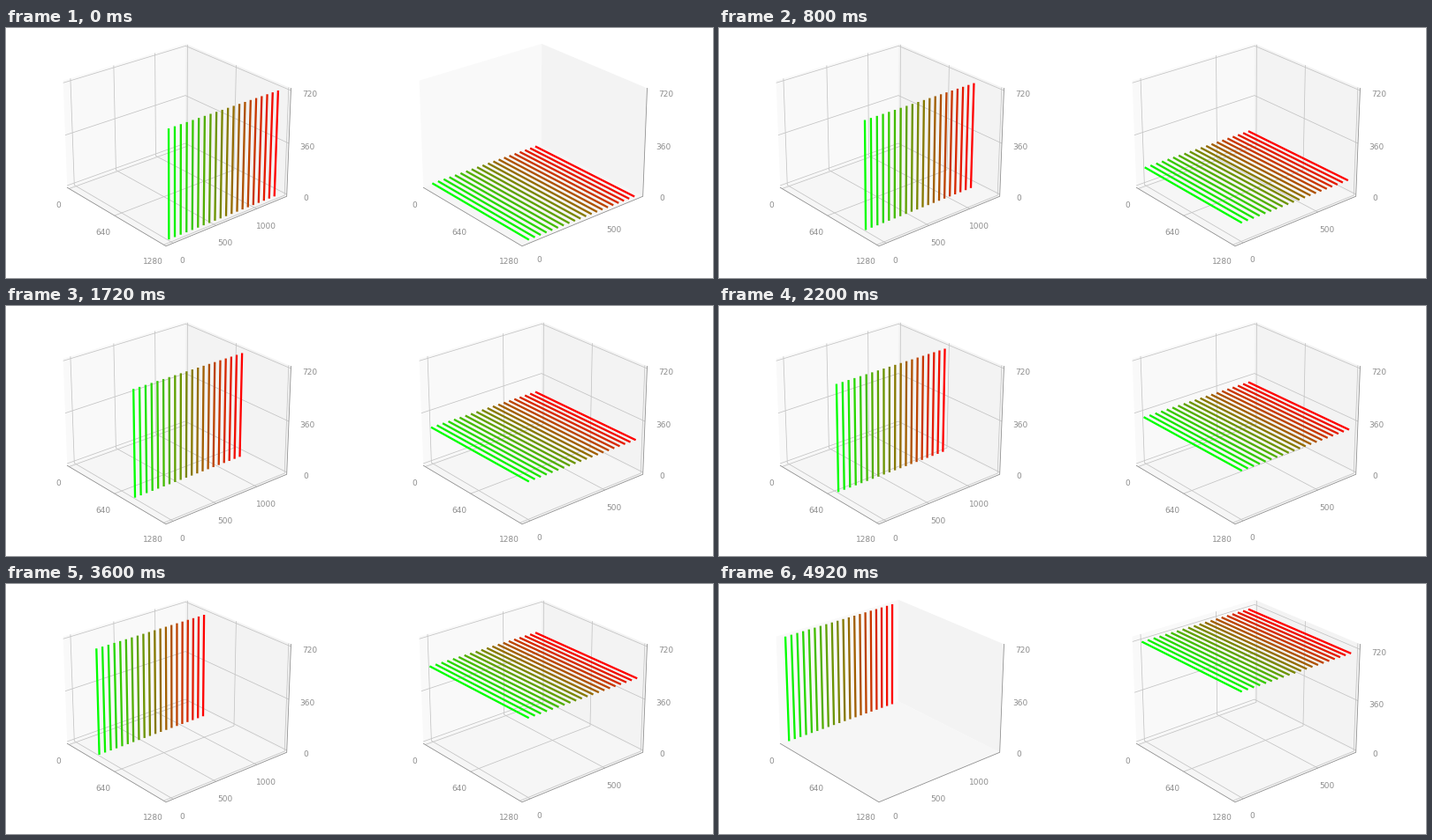
Write a matplotlib script that moves like this. It is 800x284 px and loops after 5 s.

```python
import numpy as np
import matplotlib.pyplot as plt
from matplotlib.animation import FuncAnimation
from matplotlib.collections import LineCollection

W, H, DPI = 800, 284, 100
PX = 72 / DPI                     # one pixel in points
STEPS = 50
LINES = 20
ELEV, AZIM, DIST = np.radians(25), np.radians(40), 10
HALF_BOX = np.array([0.595, 0.595, 0.4465])
SCALE = 150.9

plt.rcParams["font.family"] = "DejaVu Sans"
fig = plt.figure(figsize=(W / DPI, H / DPI), dpi=DPI, facecolor="white")
ax = fig.add_axes([0, 0, 1, 1])
ax.set_xlim(-0.5, W - 0.5)
ax.set_ylim(H - 0.5, -0.5)
ax.axis("off")

COLORS = [(t, 1 - t, 0) for t in np.linspace(0, 1, LINES)]


class Panel:
    """A perspective box with panes, grid, labels and a set of moving lines."""

    Z_TICKS = (0, 360, 720)

    def __init__(self, center, y_limits, y_ticks):
        self.center = center
        self.y_ticks = y_ticks
        self.low = np.array([-26.7, y_limits[0], -15])
        self.high = np.array([1306.7, y_limits[1], 735])
        self.draw_panes()
        self.grid = self.add_lines("#c2c2c2", 0.75, 2)
        self.grid.set_segments(self.grid_segments())
        self.draw_axes()
        self.lines = self.add_lines(COLORS, 2.3, 4)
        self.lines.set_capstyle("projecting")

    def project(self, *point):
        low, high = self.low, self.high
        x, y, z = (2 * (np.array(point) - low) / (high - low) - 1) * HALF_BOX
        right = x * np.sin(AZIM) + y * np.cos(AZIM)
        near = x * np.cos(AZIM) - y * np.sin(AZIM)
        toward = near * np.cos(ELEV) + z * np.sin(ELEV)
        up = z * np.cos(ELEV) - near * np.sin(ELEV)
        k = SCALE * DIST / (DIST - toward)
        return self.center[0] + k * right, self.center[1] - k * up

    def path(self, *points):
        return [self.project(*p) for p in points]

    def add_lines(self, color, width, order):
        lines = LineCollection([], colors=color, linewidths=width * PX,
                               zorder=order)
        return ax.add_collection(lines, autolim=False)

    def draw_panes(self):
        (x0, y0, z0), (x1, y1, z1) = self.low, self.high
        panes = [
            ("#f9f9f9", (x0, y0, z0), (x0, y1, z0), (x0, y1, z1), (x0, y0, z1)),
            ("#f3f3f3", (x0, y1, z0), (x1, y1, z0), (x1, y1, z1), (x0, y1, z1)),
            ("#f6f6f6", (x0, y0, z0), (x1, y0, z0), (x1, y1, z0), (x0, y1, z0)),
        ]
        for color, *corners in panes:
            ax.fill(*zip(*self.path(*corners)), color=color, lw=0, zorder=1)

    def grid_segments(self):
        (x0, y0, z0), (x1, y1, z1) = self.low, self.high
        rows = [[(x, y0, z0), (x, y1, z0), (x, y1, z1)] for x in (0, 640, 1280)]
        rows += [[(x1, y, z0), (x0, y, z0), (x0, y, z1)] for y in self.y_ticks]
        rows += [[(x0, y0, z), (x0, y1, z), (x1, y1, z)] for z in self.Z_TICKS]
        return [self.path(*row) for row in rows]

    def label(self, value, pos):
        return ax.text(*pos, str(value), size=9 * PX, color="#8e8e8e",
                       ha="center", va="center")

    def z_label_pos(self, z):
        x, y = self.project(self.high[0], self.high[1], z)
        return x + 21.3, y + 4.7

    def draw_axes(self):
        (x0, y0, z0), (x1, y1, z1) = self.low, self.high
        edge = self.path((x0, y0, z0), (x1, y0, z0), (x1, y1, z0), (x1, y1, z1))
        ax.plot(*zip(*edge), color="#8c8c8c", lw=0.8 * PX, zorder=3)
        for x in (0, 640, 1280):
            px, py = self.project(x, y0, z0)
            self.label(x, (px - 12.5, py + 19))
        for y in self.y_ticks:
            px, py = self.project(x1, y, z0)
            if y < 1000 or y1 > 1000:
                self.label(y, (px + 10.4, py + 20))
        self.z_labels = [self.label(z, self.z_label_pos(z)) for z in self.Z_TICKS]

    def set_top(self, top):
        self.high[2] = top
        self.grid.set_segments(self.grid_segments())
        for z, text in zip(self.Z_TICKS, self.z_labels):
            text.set_position(self.z_label_pos(z))


left = Panel((192.2, 125.8), (-82, 1385), (0, 500, 1000))
right = Panel((595.2, 125.8), (-52.5, 772.5), (0, 500))


def update(tick):
    # Steps alternate between 120 ms and 80 ms.
    step = 2 * (tick // 5) + (tick % 5 >= 3)
    last = step == STEPS - 1

    x = 1280 * (STEPS - 1 - step) / STEPS
    left.lines.set_segments([left.path((x, y, 0), (x, y, 720))
                             for y in np.linspace(0, 1280, LINES)])
    left.grid.set_visible(not last)

    right.set_top(755 if last else 735)
    z = 720 * step / STEPS
    right.lines.set_segments([right.path((0, y, z), (1280, y, z))
                              for y in np.linspace(0, 720, LINES)])
    right.grid.set_visible(step > 0)
    return []


anim = FuncAnimation(fig, update, frames=125, interval=40, repeat=True,
                     repeat_delay=0, init_func=lambda: update(0))
plt.show()
```
